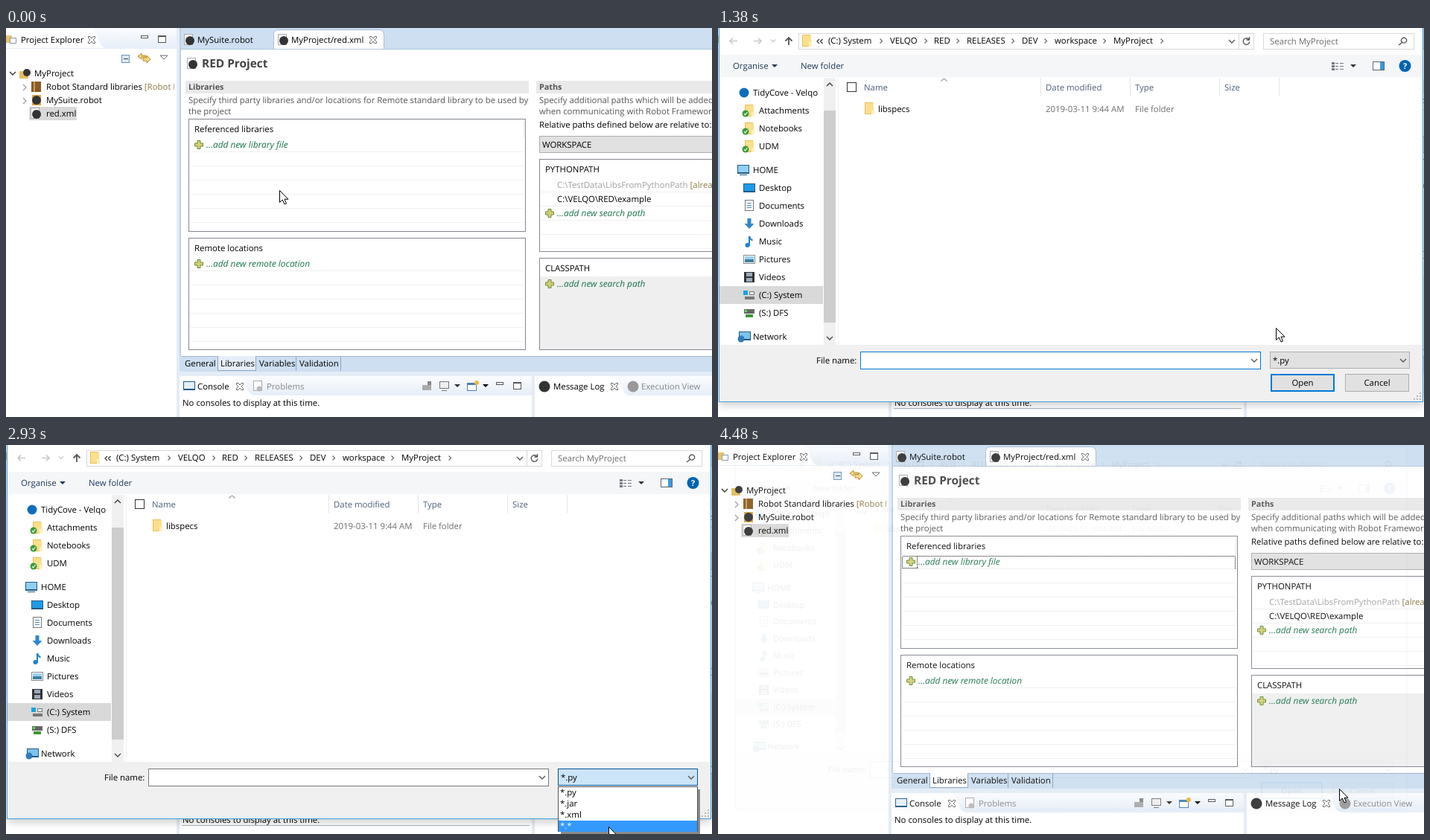
Animation of 948x523 px, one loop 4.56 s. Source, as an HTML page:

```html
<!DOCTYPE html>
<html lang="en">
<head>
<meta charset="utf-8">
<title>Add library dialog</title>
<style>
html, body { margin: 0; width: 100%; height: 100%; overflow: hidden; background: #fff; }
svg { display: block; font: 11.4px "Open Sans", sans-serif; text-rendering: geometricPrecision; }
rect { shape-rendering: crispEdges; }
.b { font-weight: bold; font-size: 10.8px; }
.h { font-weight: bold; font-size: 15.4px; }
.i { font-style: italic; font-size: 11.9px; }
.c { text-anchor: middle; }
</style>
</head>
<body>
<svg id="stage" width="948" height="523" viewBox="0 0 948 523"></svg>
<script>
// Drawing helpers: every one returns SVG markup; text takes its vertical centre.
const text = (x, y, s, fill = '#000', cls = '') =>
  `<text x="${x}" y="${y + 4}" fill="${fill}" class="${cls}">${s}</text>`;
const rect = (x, y, w, h, fill, extra = '') =>
  `<rect x="${x}" y="${y}" width="${w}" height="${h}" fill="${fill}" ${extra}/>`;
const box = (x, y, w, h, fill, stroke, extra = '') =>
  rect(x + .5, y + .5, w - 1, h - 1, fill, `stroke="${stroke}" ${extra}`);
const path = (d, stroke, width = 1, fill = 'none', extra = '') =>
  `<path d="${d}" stroke="${stroke}" stroke-width="${width}" fill="${fill}" ${extra}/>`;
const dot = (x, y, r, fill) => `<circle cx="${x}" cy="${y}" r="${r}" fill="${fill}"/>`;
const group = (id, body) => `<g id="${id}">${body}</g>`;
const each = (list, fn) => list.map(fn).join('');

const down = (x, y, c = '#555', r = 4) => path(`M${x - r} ${y - r / 2}l${r} ${r}l${r} ${-r}`, c, 1.3);
const right = (x, y, c = '#666', r = 3) => path(`M${x - r / 2} ${y - r}l${r} ${r}l${-r} ${r}`, c, 1.2);
const triangle = (x, y, c = '#333') => path(`M${x - 4} ${y - 2}h8l-4 4z`, 'none', 0, c);
const plus = (x, y) => path(`M${x - 2} ${y - 5.5}h4v3.5h3.5v4h-3.5v3.5h-4v-3.5h-3.5v-4h3.5z`, '#6d8a3c', 1, '#d2cf74');
const close = (x, y) => path(`M${x - 4.5} ${y - 4.5}h2.5l2 2.5l2 -2.5h2.5v2l-2.5 2.5l2.5 2.5v2h-2.5l-2 -2.5l-2 2.5h-2.5v-2l2.5 -2.5l-2.5 -2.5z`, '#666', 1, '#fff');
const minMax = (x, y, x2) => box(x, y - 4, 10, 4, '#fff', '#555') + box(x2, y - 4, 11, 10, '#fff', '#555') + rect(x2, y - 4, 11, 2, '#555');
const page = (x, y) => box(x - 7, y - 8, 12, 15, '#fff', '#a9a9a9') + dot(x + 1, y + 1, 6, '#333');
const folder = (x, y) => rect(x - 6, y - 8, 11, 16, '#e8bf5a') + rect(x - 5, y - 7, 11, 14, '#fbdf8d') + rect(x + 3, y + 2, 4, 6, '#fff1bd');
const screen = (x, y, c) => rect(x - 8, y - 6, 16, 12, '#235b86') + rect(x - 7, y - 5, 14, 9, c);
const addRow = (x, y, what, id = '') => plus(x, y) + `<g id="${id}" fill="#19734b">` + text(x + 10, y, `...add new ${what}`, 'inherit', 'i') + '</g>';
const rules = (x, w, from, to) => {
  let s = '';
  for (let y = from; y < to; y += 19) s += rect(x, y, w, 1, '#f0f0f0');
  return s;
};

function explorer() {
  return rect(0, 0, 229, 523, '#fff') + rect(0, 0, 229, 28, 'url(#head)') +
    path('M0 0H113C126 0 120 27 136 27H0z', 'none', 0, '#fff') +
    rect(0, 10, 8, 10, '#e6c36c') + box(5, 13, 9, 8, '#fff', '#89a') +
    text(20, 16, 'Project Explorer') + close(115, 16) + minMax(181, 14, 204) +
    box(155, 36, 11, 11, '#dbe8f6', '#6f93b8') + rect(158, 41, 6, 1, '#345') +
    path('M182 34l-5 4l5 4v-3h6v-2h-6zM184 40h5v-3l5 5l-5 5v-3h-5z', '#b98b27', 1, '#f5d98a') +
    path('M207 37h10l-5 5z', '#666', 1, '#fff') +
    down(9, 61, '#333') + right(25, 80, '#999', 4) + right(25, 98, '#999', 4) +
    rect(18, 58, 12, 10, '#e5bd62') + dot(28, 60, 5, '#333') + text(38, 61, 'MyProject') +
    rect(34, 72, 13, 14, '#8a5a23') + rect(37, 72, 2, 14, '#c99a55') +
    `<svg width="226" height="100">${text(54, 79, 'Robot Standard libraries <tspan fill="#8d7a45">[Robot Framework]</tspan>')}</svg>` +
    rect(35, 90, 12, 14, '#d9a34a') + dot(41, 97, 6, '#333') + text(54, 97, 'MySuite.robot') +
    rect(31, 106, 64, 18, '#d9d9d9') + page(40, 115) + text(54, 115, 'red.xml');
}

function table(x, y, w, h, title) {
  return box(x, y, w, h, '#fff', '#828790') + text(x + 8, y + 13.5, title);
}

function editor() {
  const gray = '#555', dotted = 'stroke-dasharray="1 1"';
  return rect(233, 0, 715, 28, '#cddff1') + rect(233, 28, 715, 1, '#b4c7dd') +
    rect(233, 29, 715, 412, '#fff') + rect(233, 0, 2, 462, '#bcd0e6') +
    path('M359.5 28V8Q359.5 2.5 366 2.5H501Q507 2.5 507.5 9V28', '#a9bdd4', 1, '#fff') +
    page(246, 16) + text(257, 16, 'MySuite.robot') +
    page(372, 16) + text(383, 16, 'MyProject/red.xml') + close(493, 16) +
    page(250, 48) + text(263, 48.5, 'RED Project', '#444', 'h') +
    rect(241, 71, 461, 17, '#e9e9e9') + text(245, 79, 'Libraries', gray, 'b') +
    rect(712, 71, 236, 17, '#e9e9e9') + text(716, 79, 'Paths', gray, 'b') +
    text(245, 97, 'Specify third party libraries and/or locations for Remote standard library to be used by', gray) +
    text(245, 112, 'the project', gray) +
    table(245, 122, 453, 152, 'Referenced libraries') + rect(695, 124, 1, 24, '#e5e5e5') + rules(247, 449, 166, 270) +
    group('hover', rect(248, 149, 446, 17, '#fff1d2')) +
    group('focus', box(247, 149, 21, 17, 'none', '#000', dotted) +
      path('M268 149.5H694.5V166', '#000', 1, 'none', dotted)) +
    addRow(259, 157, 'library file', 'addFile') +
    table(245, 282, 453, 151, 'Remote locations') + rules(247, 449, 326, 430) + addRow(259, 317, 'remote location') +
    text(716, 97, 'Specify additional paths which will be added', gray) +
    text(716, 112, 'when communicating with Robot Framework', gray) +
    text(716, 130, 'Relative paths defined below are relative to:') +
    box(716, 145, 240, 23, '#e1e1e1', '#adadad') + text(720, 156.5, 'WORKSPACE') +
    table(716, 176, 240, 125, 'PYTHONPATH') + rules(718, 230, 220, 300) +
    text(740, 211, 'C:\\TestData\\LibsFromPythonPath <tspan fill="#8d7a45">[already defined]</tspan>', '#a0a0a0') +
    text(740, 230, 'C:\\VELQO\\RED\\example') + addRow(730, 249, 'search path') +
    table(716, 309, 240, 124, 'CLASSPATH') + rect(717, 334, 231, 98, '#efefef') + addRow(730, 344, 'search path') +
    rect(233, 441, 715, 21, '#cddff1') + rect(236, 441, 712, 1, '#9fb4cc') +
    rect(285, 441, 50, 20, '#e6eff9') + group('tabLit', rect(285, 441, 50, 19, '#fff')) +
    each([284, 335, 389, 449], x => rect(x, 442, 1, 19, '#90a4bb')) + rect(284, 460, 52, 1, '#90a4bb') +
    text(240, 451, 'General') + text(288, 451, 'Libraries') + text(340, 451, 'Variables') + text(394, 451, 'Validation');
}

function views() {
  const gray = '#888';
  return rect(233, 468, 473, 55, '#fff') + rect(233, 468, 473, 26, 'url(#head)') +
    path('M233 468H312C324 468 320 494 334 494H233z', 'none', 0, '#fff') +
    screen(246, 481, '#e4f0fb') + text(257, 482, 'Console') + close(314, 482) +
    box(332, 474, 12, 14, '#fff', '#aaa') + dot(340, 485, 3.5, '#b9b9b9') + text(350, 482, 'Problems', gray) +
    rect(559, 480, 12, 7, '#aaa') + rect(566, 475, 5, 5, '#888') + box(582, 475, 13, 10, '#eee', '#777') + rect(585, 487, 7, 1, '#777') +
    triangle(606, 481) + box(619, 477, 13, 11, '#fff', '#4a7fb5') + rect(619, 477, 13, 3, '#4a7fb5') + dot(632, 477, 3, '#e6b93c') +
    triangle(644, 481, '#000') + minMax(658, 480, 681) +
    text(237, 504, 'No consoles to display at this time.') +
    rect(710, 468, 238, 55, '#fff') + rect(710, 468, 238, 26, 'url(#head)') +
    path('M710 468H816C828 468 824 494 838 494H710z', 'none', 0, '#fff') +
    dot(723, 482, 7.5, '#333') + text(735, 482, 'Message Log') + close(817, 482) +
    dot(842, 482, 7.5, '#999') + text(853, 482, 'Execution View', gray) +
    group('strip', rect(236, 511, 467, 1, '#a9b4c0'));
}

function navigation() {
  const synced = y => folder(42, y) + dot(37, y + 4, 4.5, '#3a9b35') + path(`M35 ${y + 4}l1.5 2l3 -4`, '#fff', 1.2);
  const names = ['Desktop', 'Documents', 'Downloads', 'Music', 'Pictures', 'Videos', '(C:) System', '(S:) DFS'];
  return rect(2, 347, 139, 24, '#d9d9d9') +
    dot(35, 87, 6.5, '#0f6cbd') + text(47, 87, 'TidyCove - Velqo') +
    each(['Attachments', 'Notebooks', 'UDM'], (s, i) => synced(111 + 24 * i) + text(55, 111 + 24 * i, s)) +
    screen(34, 190, '#8fd0f5') + rect(29, 197, 10, 1, '#235b86') + text(47, 191, 'HOME') +
    each(names, (s, i) => text(55, 215 + 24 * i, s)) +
    screen(42, 215, '#1e9be8') +
    box(36, 231, 12, 15, '#fff', '#777') + each([235, 238, 241], y => rect(39, y, 6, 1, '#4d8fc4')) +
    path('M39.5 256h5v7h4l-6.5 7l-6.5 -7h4z', 'none', 0, '#2f87d0') +
    path('M42 293V280q1 4 4.5 5.5', '#1e82d2', 2) + dot(39.5, 292, 3, '#1e82d2') +
    box(34, 305, 16, 12, '#fff', '#888') + rect(36, 307, 12, 4, '#9bd0f0') + rect(36, 311, 12, 4, '#3c7e9c') +
    rect(35, 328, 14, 14, '#333') + rect(38, 329, 8, 5, '#9ab') + rect(38, 336, 8, 5, '#9ab') +
    rect(34, 353, 6, 6, '#16a5e0') + rect(36, 361, 13, 4, '#777') + box(42, 354, 7, 5, '#eee', '#777') +
    rect(35, 378, 14, 6, '#666') + rect(36, 379, 3, 3, '#5d5') + rect(37, 385, 10, 4, '#3a9b35') +
    screen(36, 414, '#7cc4ee') + dot(31, 418, 4.5, '#2f7cb8') + text(47, 415, 'Network') +
    rect(142, 67, 16, 359, '#f0f0f0') + rect(142, 111, 16, 285, '#cdcdcd') +
    path('M146 78l4 -4l4 4', '#444', 1.5) + down(150, 417, '#444') + rect(161, 67, 1, 359, '#f0f0f0');
}

function dialog() {
  const ink = '#1e395b', head = '#4c607a', gray = '#6d6d6d';
  const crumbs = [[148, '(C:) System', 219], [231, 'VELQO', 279], [290, 'RED', 322], [334, 'RELEASES', 396],
    [408, 'DEV', 440], [452, 'workspace', 519], [531, 'MyProject', 596]];
  const columns = [[196, 'Name', 433], [440, 'Date modified', 553], [560, 'Type', 673], [680, 'Size', 753]];
  return rect(1, -4, 946, 511, '#000', 'opacity=".2" filter="url(#soft)"') +
    rect(1, -8, 946, 511, '#fff') + rect(2, 36, 944, 30, '#f5f6f7') + rect(2, 426, 944, 76, '#f0f0f0') +
    path('M26 17.5h-10m4 -4l-4 4l4 4M48 17.5h10m-4 -4l4 4l-4 4', '#c8c8c8', 1.6) + down(74, 17, '#ccc', 3) +
    path('M95 23v-10m-4.5 4.5l4.5 -4.5l4.5 4.5', '#555', 1.8) +
    box(108, 7, 612, 22, '#fff', '#d9d9d9') + folder(119, 17) +
    path('M136 15l-3 3l3 3M140.5 15l-3 3l3 3', '#333', 1.2) +
    each(crumbs, ([x, s, arrow]) => text(x, 17, s) + right(arrow, 17.5)) +
    down(690, 18) + rect(699, 8, 1, 20, '#d9d9d9') +
    path('M713 15.5a4.3 4.3 0 1 0 .8 3M713.5 12v4h-4', '#555', 1.4) +
    box(732, 7, 203, 22, '#fff', '#d9d9d9') + text(741, 18, 'Search MyProject', gray) +
    path('M919 19l-5 4M919 19.5a3.5 3.5 0 1 1 5 -1a3.5 3.5 0 0 1 -5 1', '#555', 1.4) +
    text(20, 51, 'Organise', ink) + triangle(76, 51, ink) + text(111, 51, 'New folder', ink) +
    each([46, 50, 54], y => rect(824, y, 4, 3, '#778') + rect(829, y + 1, 4, 1, '#778') + rect(835, y + 1, 5, 1, '#778')) +
    triangle(853, 51) + box(879, 45, 16, 12, '#fff', '#567') + rect(889, 46, 5, 10, '#3a9bdc') +
    dot(922.5, 51, 8, '#0063b1') + text(922.5, 51, '?', '#fff', 'b c') +
    navigation() +
    box(173, 73, 13, 13, '#fff', '#333') + path('M299.5 71.5l4 -3.5l4 3.5', '#666') +
    each(columns, ([x, s, line]) => text(x, 80, s, head) + rect(line, 67, 1, 25, '#e5e5e5')) +
    folder(203, 108) + text(215, 109, 'libspecs') + text(440, 109, '2019-03-11 9:44 AM', gray) + text(560, 109, 'File folder', gray) +
    text(132, 447, 'File name:') + box(191, 435, 538, 24, '#fff', '#0078d7', 'id="field"') + down(720, 447) +
    group('caret', rect(195, 439, 1, 15, '#000')) +
    box(741, 435, 188, 23, '#e1e1e1', '#adadad', 'id="filter"') + text(745, 447, '*.py') + down(920, 447) +
    rect(743, 466, 84, 22, '#e1e1e1', 'stroke="#0078d7" stroke-width="2"') + text(785, 477, 'Open', '#000', 'c') +
    box(842, 465, 86, 24, '#e1e1e1', '#adadad') + text(885, 477, 'Cancel', '#000', 'c') +
    each([[942, 492], [942, 496], [938, 496], [942, 500], [938, 500], [934, 500]], ([x, y]) => rect(x, y - 2, 2, 2, '#bbb')) +
    box(1, -8, 946, 511, 'none', '#3f9fdf') +
    group('list', rect(745, 463, 187, 61, '#8a8a8a') + box(741, 459, 188, 61, '#fff', '#555') +
      rect(742, 460, 186, 15, '#3399ff', 'id="pick"') +
      each(['*.py', '*.jar', '*.xml', '*.*'], (s, i) => `<g class="option">${text(744, 467 + 15 * i, s, 'inherit')}</g>`));
}

stage.innerHTML = `<defs><linearGradient id="head" x2="0" y2="1">
  <stop stop-color="#fbfcfe"/><stop offset="1" stop-color="#e6eef8"/></linearGradient>
  <filter id="soft"><feGaussianBlur stdDeviation="6"/></filter></defs>` +
  rect(0, 0, 948, 523, '#e4ecf5') + explorer() + editor() + views() + group('dialog', dialog()) +
  group('cursor', path('M.5 .5V16.5L4.3 13L7 19L9.5 18L7 12.2H12z', '#000', 1, '#fff'));

const $ = id => document.getElementById(id);
const show = (id, on) => $(id).setAttribute('visibility', on ? 'visible' : 'hidden');
const options = document.querySelectorAll('.option');

// The screen is sampled at a coarse tick; all positions below are in ticks.
const LOOP = 4560, TICK = 77.2, LAST = 58;
const cursorKeys = [[0, 367, 218], [5, 335, 155], [12, 335, 155], [17, 695, 370], [19, 803, 435], [20, 803, 435],
  [25, 813, 445], [27, 813, 445], [34, 811, 494], [38, 809, 513], [49, 809, 513], [53, 834, 462], [LAST, 834, 462]];
const fades = { 11: [.35, .965], 12: [.84, .992], 57: [.45, .98], 58: [.06, .954] };

function cursorAt(tick) {
  const i = Math.max(1, cursorKeys.findIndex(k => k[0] >= tick));
  const [t0, x0, y0] = cursorKeys[i - 1], [t1, x1, y1] = cursorKeys[i];
  const p = (tick - t0) / (t1 - t0);
  return [Math.round(x0 + (x1 - x0) * p), Math.round(y0 + (y1 - y0) * p)];
}

function draw(now) {
  const tick = Math.min(LAST, Math.floor(now % LOOP / TICK + .21));
  const [x, y] = cursorAt(tick);
  $('cursor').setAttribute('transform', `translate(${x} ${y})`);

  const hover = tick < 11 && y >= 149 && y < 167;
  show('hover', hover);
  show('focus', tick >= 5 && tick < 11 || tick >= 57);
  $('addFile').setAttribute('fill', hover ? '#000' : '#19734b');
  show('tabLit', tick >= 5 && tick < 8 || tick >= 57);

  const [alpha, scale] = fades[tick] || [tick > 12 ? 1 : 0, 1];
  $('dialog').setAttribute('opacity', alpha);
  $('dialog').setAttribute('transform', `translate(470 210) scale(${scale}) translate(-470 -210)`);
  show('strip', tick >= 12 && tick < 57);
  show('caret', tick < 18);
  $('field').setAttribute('stroke', tick < 30 ? '#0078d7' : '#7a7a7a');

  const open = tick >= 22 && tick < 51;
  const hot = open || x > 741 && y >= 435 && y < 459;
  $('filter').setAttribute('fill', hot ? '#cce4f7' : '#e1e1e1');
  $('filter').setAttribute('stroke', hot ? '#005499' : '#adadad');
  show('list', open);
  const row = Math.max(0, Math.min(3, Math.floor((y - 460) / 15)));
  $('pick').setAttribute('y', 460 + 15 * row);
  options.forEach((o, i) => o.setAttribute('fill', i === row ? '#fff' : '#000'));
  requestAnimationFrame(() => draw(performance.now()));
}
draw(0);
</script>
</body>
</html>
```
